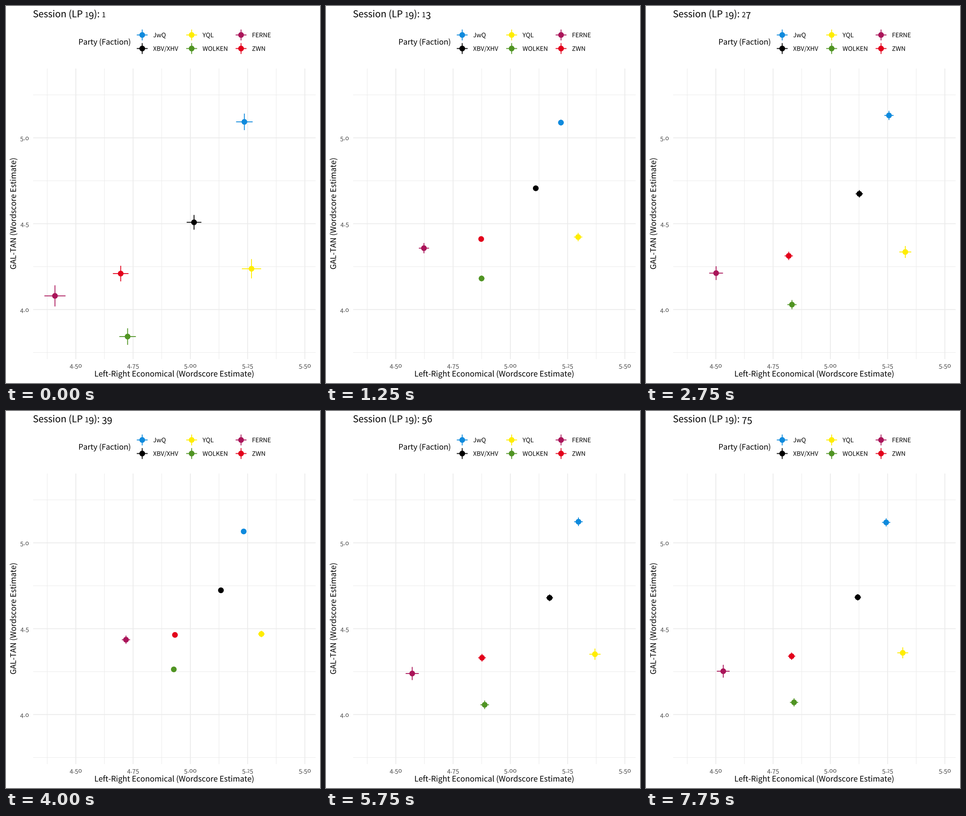
Write a matplotlib script that moves like this. It is 683 px wide and 820 px high and loops after 8 s.

```python
from itertools import groupby

import numpy as np
import matplotlib.pyplot as plt
from matplotlib.animation import FuncAnimation
from matplotlib.patches import Circle, PathPatch
from matplotlib.path import Path
from matplotlib.textpath import TextPath
from matplotlib.transforms import Affine2D

W, H, DPI = 683, 820, 64
FRAMES, INTERVAL = 32, 250
PT = 72 / DPI
FONT = {"family": "Noto Sans CJK JP"}

GRID, TICK = "#EBEBEB", "#4D4D4D"
LEFT, RIGHT, TOP, BOTTOM = 59, 673.5, 136, 768
BAR, DOT = 1.8, 6.2

# Name, colour and usual half length of the error bars
PARTIES = [("JwQ", "#0E8ADD", 10), ("XBV/XHV", "#000000", 8),
           ("YQL", "#FFED00", 13), ("WOLKEN", "#509423", 10),
           ("FERNE", "#AA1459", 15), ("ZWN", "#E3001B", 9)]
REACH = np.array([reach for *_, reach in PARTIES])

# Three arrangements of the parties, in stage pixels
OPENING = np.array([(518.5, 252), (409, 470.5), (534, 571.5),
                    (264.5, 719), (106.5, 630.5), (249.5, 582)])
TIGHT = np.array([(517, 262), (467.5, 390), (555.5, 485),
                  (365, 562), (261, 497.5), (367.5, 487)])
HIGH = np.array([(565, 220), (497, 381.5), (582.5, 511),
                 (372.5, 620), (195, 544.5), (372.5, 517.5)])
# How each party moves when the tight group spreads out
OUTWARD = np.array([(11.5, -24), (-3.5, 18.5), (8.5, 50),
                    (-47.5, 87.5), (-108.5, 83.5), (-57, 56.5)])


def pose(centres, grow):
    """Rows of x, y, bar half width and bar half height."""
    reach = REACH + grow
    return np.column_stack([centres, reach, reach])


def spread(out, dx=0):
    """The tight group pushed outward and sideways; bars grow with it."""
    return pose(TIGHT + out * OUTWARD + (dx, 0), 6 * (out - 1))


KEYS = {0: pose(OPENING, 8), 2: spread(.6, 42), 5: spread(.35, -10),
        10: spread(.8, 22), 11: spread(1), 15: spread(.35, -3),
        16: spread(0), 20: spread(.12, -10), 23: spread(.88, 22),
        27: pose(HIGH, -1), 30: spread(1.4, 34), 31: spread(.82, -4)}


def pose_at(i):
    times = list(KEYS)
    k = min(np.searchsorted(times, i, side="right"), len(times) - 1)
    a, b = times[k - 1], times[k]
    return KEYS[a] + (KEYS[b] - KEYS[a]) * (i - a) / (b - a)


def outline(s):
    return TextPath((0, 0), s, size=1, prop=FONT)


def advance(s):
    return outline(s + "|").get_extents().x1 - outline("|").get_extents().x1


def old_style(digit):
    """Glyph, scale and drop that give a digit its old-style form."""
    if digit == "0":
        return "o", 1, 0
    if digit in "12":
        return digit, .75, 0
    return digit, 1, .19 if digit in "34579" else 0


def text_path(s, x, y, size, anchor=0, angle=0):
    """Outline of s with its baseline at y; anchor 0, .5 or 1 aligns it."""
    pieces = []
    for is_digit, run in groupby(s, str.isdigit):
        run = "".join(run)
        pieces += [old_style(c) for c in run] if is_digit else [(run, 1, 0)]
    parts, pen = [], 0
    for run, scale, drop in pieces:
        place = Affine2D().scale(scale).translate(pen, -drop)
        parts.append(outline(run).transformed(place))
        pen += advance(run) * scale
    place = (Affine2D().translate(-anchor * pen, 0).scale(size, -size)
             .rotate_deg(angle).translate(x, y))
    return Path.make_compound_path(*parts).transformed(place)


def add_text(*args, color="black", **kw):
    patch = PathPatch(text_path(*args, **kw), fc=color, lw=0, zorder=4)
    return ax.add_patch(patch)


def add_line(xs, ys, color, width, z):
    return ax.plot(xs, ys, color=color, lw=width * PT, zorder=z, snap=False,
                   solid_capstyle="butt")[0]


def add_mark(color):
    bars = [add_line([], [], color, BAR, 3) for _ in range(2)]
    dot = ax.add_patch(Circle((0, 0), DOT, fc=color, lw=0, zorder=3))
    return bars, dot


def place_mark(mark, x, y, ex, ey):
    (across, upright), dot = mark
    across.set_data([x - ex, x + ex], [y, y])
    upright.set_data([x, x], [y - ey, y + ey])
    dot.center = x, y


def draw_grid():
    for k in range(10):
        x = 89.6 + 62.28 * k
        add_line([x, x], [TOP, BOTTOM], GRID, 1.8 if k % 2 else 1, 1)
        if k % 2:
            add_text(f"{4.375 + .125 * k:.2f}", x, 786.5, 13.4, anchor=.5,
                     color=TICK)
    for k in range(7):
        y = 753.7 - 93.4 * k
        add_line([LEFT, RIGHT], [y, y], GRID, 1.8 if k % 2 else 1, 1)
        if k % 2:
            add_text(f"{3.75 + .25 * k:.1f}", 50, y + 5, 13.4, anchor=1,
                     color=TICK)


def draw_legend():
    add_text("Party (Faction)", 157.5, 84, 16.6)
    for k, (name, color, _) in enumerate(PARTIES):
        x, y = 296.3 + 107.5 * (k // 2), 63 + 29.5 * (k % 2)
        place_mark(add_mark(color), x, y, 11.8, 11.8)
        add_text(name, x + 23.7, y + 5, 13.4)


fig = plt.figure(figsize=(W / DPI, H / DPI), dpi=DPI, facecolor="white")
ax = fig.add_axes([0, 0, 1, 1])
ax.axis("off")

draw_grid()
draw_legend()
add_text("Left-Right Economical (Wordscore Estimate)", 366, 806, 16.9, anchor=.5)
add_text("GAL-TAN (Wordscore Estimate)", 21.7, 451.5, 16.9, anchor=.5, angle=-90)
title = add_text("Session (LP 19): 1", 58.5, 24.5, 20.4)
marks = [add_mark(color) for _, color, _ in PARTIES]
ax.set(xlim=(0, W), ylim=(H, 0))


def update(i):
    session = round(1 + 2.4 * i)
    title.set_path(text_path(f"Session (LP 19): {session}", 58.5, 24.5, 20.4))
    for mark, row in zip(marks, pose_at(i)):
        place_mark(mark, *row)
    return [title]


anim = FuncAnimation(fig, update, frames=FRAMES, interval=INTERVAL,
                     repeat=True, repeat_delay=0, blit=False)
plt.show()
```
